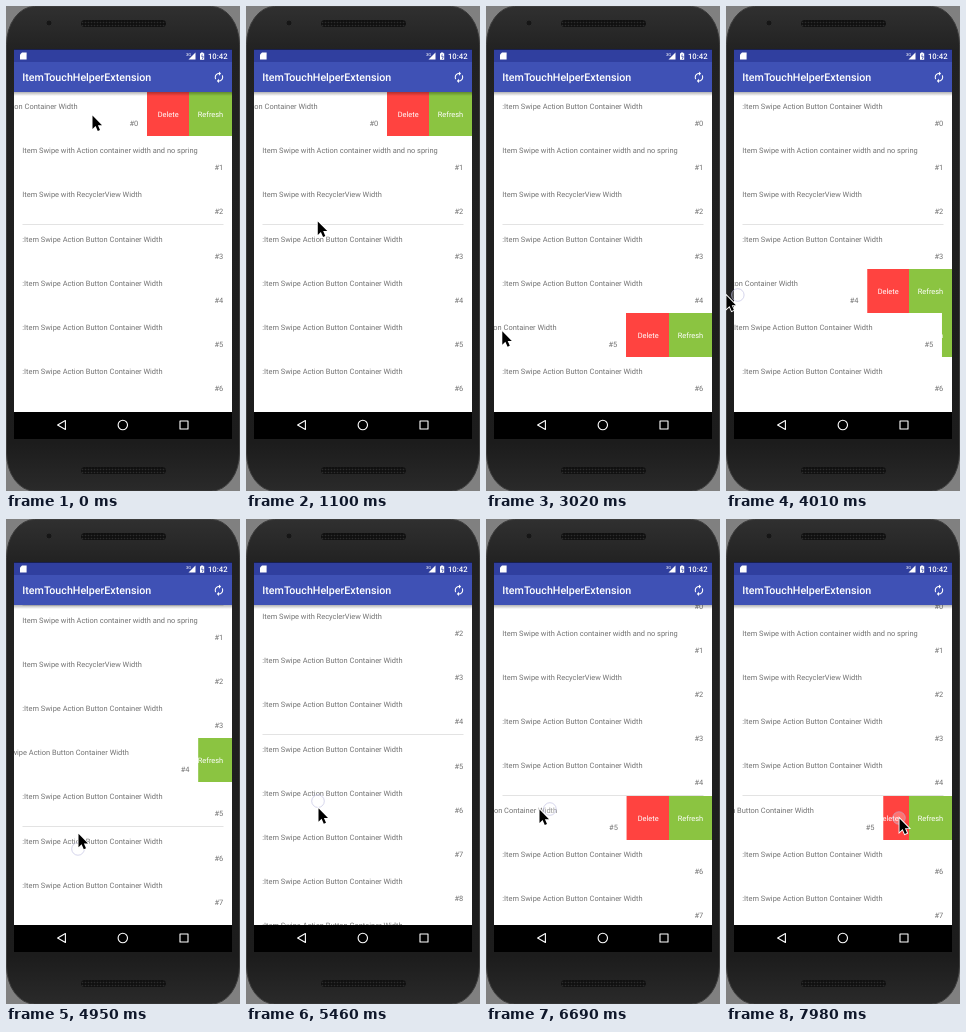
Recreate the animation shown at these times as an HTML page. Size 234 by 485 pixels, loop 8000 ms.

```html
<!DOCTYPE html>
<html lang="en">
<head>
<meta charset="utf-8">
<title>Swipe list</title>
<style>
html, body { margin: 0; width: 100%; height: 100%; overflow: hidden; background: #808080; }
svg { display: block; width: 234px; height: 485px; }
text { font-family: Roboto, "Open Sans", sans-serif; font-size: 7.45px; text-rendering: geometricPrecision; }
.label { fill: #727272; }
.white { fill: #fff; }
.red { fill: #ff4340; }
.green { fill: #8bc441; }
.line { fill: #dcdcdc; }
</style>
</head>
<body>
<svg viewBox="0 0 234 485">
  <defs>
    <linearGradient id="body" x2="0" y2="1">
      <stop offset="0" stop-color="#303030"/><stop offset=".09" stop-color="#222"/>
      <stop offset=".9" stop-color="#1c1c1c"/><stop offset="1" stop-color="#2a2a2a"/>
    </linearGradient>
    <linearGradient id="shade" x2="0" y2="1">
      <stop offset="0" stop-opacity=".3"/><stop offset="1" stop-opacity="0"/>
    </linearGradient>
    <pattern id="mesh" width="3" height="3" patternUnits="userSpaceOnUse">
      <rect width="3" height="3" fill="#101010"/><circle cx="1.5" cy="1.5" r=".8" fill="#2c2c2c"/>
    </pattern>
    <clipPath id="list"><rect x="8" y="86" width="218" height="320"/></clipPath>
  </defs>

  <!-- phone -->
  <rect x=".5" y=".5" width="233" height="484.5" rx="28" ry="38" fill="url(#body)" stroke="#3c3c3c"/>
  <circle cx="43" cy="17" r="3" fill="#161616" stroke="#2c2c2c"/>
  <rect x="75" y="14" width="85" height="7" rx="3.5" fill="url(#mesh)"/>
  <rect x="75" y="461" width="85" height="7" rx="3.5" fill="url(#mesh)"/>
  <rect x="8" y="43" width="218" height="390"/>
  <rect x="8" y="86" width="218" height="320" fill="#fdfdfd"/>

  <g clip-path="url(#list)">
    <g id="rows"></g>
    <rect x="8" y="86" width="218" height="4" fill="url(#shade)"/>
  </g>

  <!-- status bar, app bar -->
  <rect x="8" y="43.5" width="218" height="13" fill="#303f9f"/>
  <rect x="8" y="56" width="218" height="30" fill="#3f51b5"/>
  <g class="white">
    <path d="M16 46.5h4.6v7H14v-5z"/>
    <path d="M189.5 46.5v7h-7z"/>
    <path d="M194 47.2h1v-.8h2.2v.8h1v6.5H194z"/>
    <text x="202" y="52.9" font-weight="500" style="font-size:7.7px">10:42</text>
    <text x="180" y="50" style="font-size:4.2px">3G</text>
    <text x="16.3" y="75.3" font-weight="500" style="font-size:10.68px">ItemTouchHelperExtension</text>
    <path transform="translate(206.6 64.9) scale(.53)" d="M12 6v3l4-4-4-4v3c-4.42 0-8 3.58-8 8 0 1.57.46 3.03 1.24 4.26L6.7 14.8c-.45-.83-.7-1.79-.7-2.8 0-3.31 2.69-6 6-6zm6.76 1.74L17.3 9.2c.44.84.7 1.79.7 2.8 0 3.31-2.69 6-6 6v-3l-4 4 4 4v-3c4.42 0 8-3.58 8-8 0-1.57-.46-3.03-1.24-4.26z"/>
  </g>
  <path d="M196.2 48.3l-.5 2.3h1.6l-1 2.4" fill="none" stroke="#303f9f" stroke-width=".7"/>

  <!-- navigation bar -->
  <g fill="none" stroke="#fff" stroke-width="1.1" stroke-linejoin="round">
    <path d="M51.6 419l7.8-4.4v8.8z"/>
    <circle cx="116.8" cy="419" r="4.7"/>
    <rect x="174" y="415" width="8" height="8"/>
  </g>

  <circle id="touch" r="6.3" fill="#fff" fill-opacity=".25" stroke="#b4b4dc" stroke-opacity=".55"/>
  <path id="cursor" d="M.5 .5V14L3.6 11 5.8 16 8 15 5.9 10.2H10Z" stroke="#fff" stroke-width="1.8" paint-order="stroke"/>
</svg>
<script>
const PITCH = 44.2, LOOP = 8000, OPEN = 85, SWIPE = 300, CLOSE = 350, LAG = 40;
const $ = id => document.getElementById(id);
const clamp = u => Math.min(1, Math.max(0, u));
const ease = u => (u = clamp(u), u * u * (3 - 2 * u));

// Each swipe ends at (x, y); its row stays open until `close`.
const swipes = [
  { row: 0, open: -600, close: 1500, x: 86, y: 109 },
  { row: 4, open: 1490, close: 2560, x: 0, y: 287 },
  { row: 5, open: 2520, close: 3736, x: 0, y: 331 },
  { row: 4, open: 3740, close: 4752, x: -3, y: 289 },
  { row: 5, open: 6415, close: 7883, x: 51, y: 290 }
];
const drag = { start: 4710, end: 5860, grip: 373.5 };
const TAP = 7883;

// Where the pointer rests between swipes.
const stop = (arrive, leave, x, y) => ({ arrive, leave, x, y });
const path = [
  stop(0, 50, 86, 109), stop(400, 420, 1, 112), stop(810, 870, 45, 166), stop(1910, 2090, 22, 274),
  stop(4480, drag.start, 72, 380), stop(5150, 5230, 72, 265), stop(drag.end, drag.end, 72, 343),
  stop(6900, 7160, 23, 296), stop(7620, LOOP, 173, 299),
  ...swipes.flatMap(({ open, x, y }) => [
    stop(open - 90, open, x + 110, y), stop(open + SWIPE, open + SWIPE, x, y)])
].sort((a, b) => a.arrive - b.arrive);

function pointer(t) {
  const i = path.findIndex(p => p.arrive > t);
  if (i < 0) return path[path.length - 1];
  const a = path[i - 1], b = path[i], u = ease((t - a.leave) / (b.arrive - a.leave));
  return { x: a.x + (b.x - a.x) * u, y: a.y + (b.y - a.y) * u };
}

// The list follows the finger while dragged and stays where it is let go.
function scrollAt(t) {
  if (t < drag.start) return 0;
  return Math.max(0, drag.grip - pointer(Math.min(t - LAG, drag.end)).y);
}

// A row opens slightly too far, then settles.
function shiftAt(row, t) {
  return swipes.filter(s => s.row === row).reduce((sum, { open, close }) => sum
    + OPEN * (ease((t - open) / SWIPE) - ease((t - close) / CLOSE))
    + 2 * Math.sin(Math.PI * clamp((t - open) / SWIPE / 2)), 0);
}

const pressed = t => t >= TAP || t > drag.start - LAG && t < drag.end + LAG
  || swipes.some(s => t > s.open - LAG && t < s.open + SWIPE + LAG);

const titles = [, 'Item Swipe with Action container width and no spring', 'Item Swipe with RecyclerView Width'];
$('rows').innerHTML = Array.from({ length: 10 }, (_, i) => `<g>
  <g class="white">
    <rect class="red" x="130" width="54" height="44"/>
    <rect class="green" x="183" width="43" height="44"/>
    <text x="162.2" y="24.8" text-anchor="middle">Delete</text>
    <text x="204.5" y="24.8" text-anchor="middle">Refresh</text>
  </g>
  <g class="label">
    <rect class="white" x="8" width="218" height="45"/>
    <text x="16.3" y="16.8">${titles[i] || ':Item Swipe Action Button Container Width'}</text>
    <text x="217.3" y="33.5" text-anchor="end">#${i}</text>
    <rect class="line" x="16.5" y="44" width="201" height=".8"/>
  </g></g>`).join('');
const rows = [...$('rows').children];

const move = (el, x, y) => el.setAttribute('transform', `translate(${x} ${y})`);
const show = (el, on) => el.setAttribute('visibility', on ? 'visible' : 'hidden');

function draw(now) {
  const t = now % LOOP, scroll = scrollAt(t);
  rows.forEach((row, i) => {
    const [buttons, front] = row.children, shift = shiftAt(i, t);
    move(row, 0, Math.round(86 + i * PITCH - scroll));
    move(front, -shift, 0);
    show(buttons, shift > .05);
  });
  const tip = pointer(t), finger = pointer(t - LAG);
  move($('cursor'), tip.x, tip.y);
  move($('touch'), finger.x, finger.y);
  show($('touch'), pressed(t));
  requestAnimationFrame(draw);
}
draw(performance.now());
</script>
</body>
</html>
```
